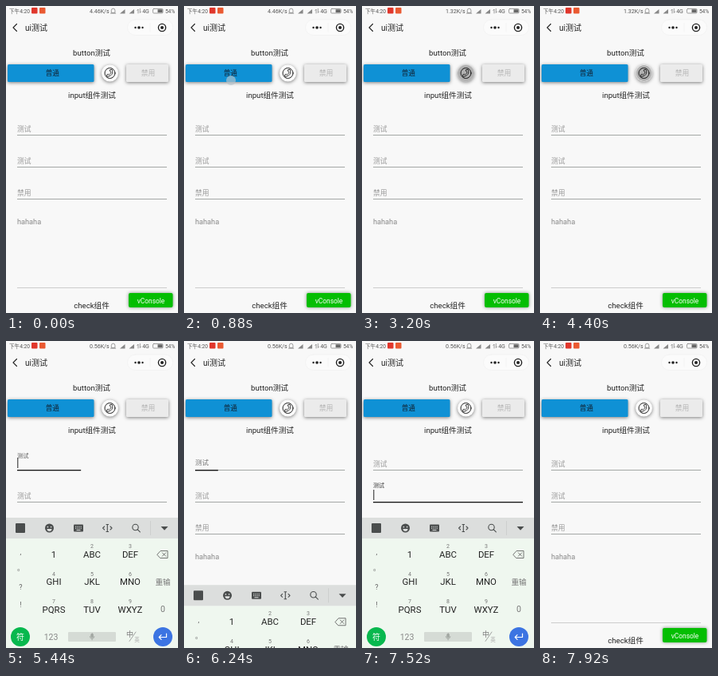
An HTML page that plays this animation: 216x384 px, repeating every 8000 ms.

```html
<!DOCTYPE html>
<html lang="zh">
<head>
<meta charset="utf-8">
<title>ui测试</title>
<style>
  html, body { margin: 0; height: 100%; overflow: hidden; background: #f8f8f8; }
  svg { display: block; width: 100vw; height: 100vh; }
  text { font-family: Roboto, "Noto Sans CJK SC", "Noto Sans CJK", sans-serif; }
  .raised { filter: drop-shadow(0 1.6px 1.9px rgba(0, 0, 0, .5)); }
  .glow { filter: drop-shadow(0 0 2.2px rgba(0, 40, 0, .5)); }
  .line { fill: none; stroke-linecap: round; stroke-linejoin: round; }
</style>
</head>
<body>
<svg id="stage" viewBox="0 0 216 384">
  <defs>
    <clipPath id="buttonClip"><rect x="2" y="73" width="108.500" height="22" rx="1.500"/></clipPath>
    <clipPath id="phoneClip"><circle cx="130.500" cy="84" r="10.500"/></clipPath>
  </defs>
  <rect width="216" height="384" fill="#f8f8f8"/>

  <g id="status">
    <rect x="32" y="2" width="7.500" height="7.500" rx="1" fill="#e0372c"/>
    <rect x="42" y="2" width="7.500" height="7.500" rx="1" fill="#ea5a32"/>
    <g class="line" stroke="#777" stroke-width=".7">
      <path d="M132.300 8V5.500a2.300 2.300 0 0 1 4.600 0V8zM131.500 9.200h6.200"/>
      <path d="M166 9V4l-1.200 1.400M168.300 3.500v5l1.200-1.400"/>
      <rect x="184.500" y="3.500" width="12.500" height="5.500" rx="1.200"/>
    </g>
    <path d="M143 9.500h6.500v-5.500zM154.500 9.500h6.500v-5.500z" fill="#888"/>
    <rect x="190.500" y="4.300" width="6" height="3.900" fill="#666"/>
  </g>

  <g class="line" stroke="#222">
    <path d="M13.500 22.500 9 27l4.500 4.500" stroke-width="1.100"/>
    <rect x="152.500" y="17" width="57" height="19.500" rx="9.750" fill="#fbfbfb" stroke="#eee" stroke-width=".6"/>
    <path d="M181 21.500v10.500" stroke="#eee" stroke-width=".6"/>
    <circle cx="196" cy="27" r="4.600" stroke-width="1.400"/>
  </g>
  <g fill="#222">
    <circle cx="162.500" cy="27" r="1.200"/><circle cx="167" cy="27" r="1.800"/>
    <circle cx="171.500" cy="27" r="1.200"/><circle cx="196" cy="27" r="2"/>
  </g>

  <g id="buttons">
    <rect class="raised" x="2" y="73" width="108.500" height="22" rx="1.500" fill="#0f91d5"/>
    <circle class="raised" cx="130.500" cy="84" r="10.500" fill="#fcfcfc"/>
    <rect class="raised" x="151" y="73" width="53" height="22" rx="1.500" fill="#ebebeb"/>
    <g class="line" transform="translate(130.500 84)" stroke="#222">
      <circle r="6.500" stroke-width="1"/>
      <path d="M.4-4.300 2.500-4.600C5 0 1.500 4.300-3.700 4.200L-4.200 2.200-2.200 1.300-1.200 2C.6 1.200 1.500-.2 1.300-1.800L.2-2.500z" stroke-width=".9"/>
    </g>
  </g>
  <g id="ripplesButton" clip-path="url(#buttonClip)"></g>
  <g id="ripplesPhone" clip-path="url(#phoneClip)"></g>

  <g id="form"></g>
  <rect class="glow" x="154" y="359" width="55.500" height="18" rx="2" fill="#04be02"/>
  <g id="labels"></g>
  <g id="touches"></g>

  <g id="keyboard">
    <rect y="221" width="216" height="163" fill="#eff7ef"/>
    <rect y="221" width="216" height="26" fill="#dcdedd"/>
    <rect x="12" y="228" width="12" height="12" rx="1" fill="#4a4d4d"/>
    <circle cx="54.500" cy="234" r="5.500" fill="#4a4d4d"/>
    <g fill="#dcdedd">
      <circle cx="52.400" cy="232.600" r=".9"/><circle cx="56.600" cy="232.600" r=".9"/>
      <path d="M51.500 235h6a3 3 0 0 1-6 0z"/>
    </g>
    <rect x="85" y="229.500" width="12" height="9" rx="1" fill="#4a4d4d"/>
    <path d="M87 232.300h8M87 234.300h8" stroke="#dcdedd" stroke-dasharray="1.200 1"/>
    <path d="M88.500 236.500h5" stroke="#dcdedd"/>
    <g class="line" stroke="#4a4d4d" stroke-width="1.100">
      <path d="M127.300 229.500v9M126 229.500h2.600M126 238.500h2.600M123.600 232l-2 2 2 2M131 232l2 2-2 2"/>
      <circle cx="162.500" cy="233" r="3.700"/><path d="m165.300 235.800 3 3"/>
    </g>
    <path d="M181.500 225v18" stroke="#c6c9c8" stroke-width=".7"/>
    <path d="M194.500 232h9l-4.500 4.700z" fill="#4a4d4d"/>
    <g class="line" stroke="#666" stroke-width=".9">
      <path d="M190 267l4-4.500h9v9h-9zM196.300 264.800l4.400 4.400M200.700 264.800l-4.400 4.400"/>
      <path d="M155 375.500 163 364" stroke="#999"/>
    </g>
    <rect x="78" y="364" width="60" height="12" rx="1" fill="#d5dbd5"/>
    <g class="line" stroke="#a2a7a2" stroke-width=".9">
      <rect x="106.800" y="366" width="2.600" height="5" rx="1.300" fill="#a2a7a2"/>
      <path d="M105.300 369.500a2.800 2.800 0 0 0 5.600 0M108.100 372.300v1.700"/>
    </g>
    <circle cx="18" cy="370" r="12" fill="#08b84e"/>
    <circle cx="197" cy="370" r="12" fill="#3c74e2"/>
    <path class="line" d="M201.500 366v4.500h-9M195 367.700l-2.800 2.800 2.800 2.800" stroke="#fff" stroke-width="1.200"/>
    <g id="keys"></g>
  </g>
</svg>
<script>
const LOOP = 8000;
const $ = id => document.getElementById(id);

function add(parent, tag, attrs) {
  const el = document.createElementNS('http://www.w3.org/2000/svg', tag);
  for (const name in attrs) el.setAttribute(name, attrs[name]);
  return parent.appendChild(el);
}

// y is the vertical centre of the text
function label(parent, str, x, y, size, fill, anchor = 'middle', weight = 400) {
  const el = add(parent, 'text', {
    x, y: y + size * .36, 'font-size': size, fill, 'text-anchor': anchor, 'font-weight': weight
  });
  el.textContent = str;
  return el;
}

// steps: [ms, value, easing to the next step]
function animate(el, prop, steps) {
  const all = [[0, steps[0][1]], ...steps, [LOOP, steps[steps.length - 1][1]]];
  el.animate(all.map(([ms, value, easing = 'linear']) => ({ offset: ms / LOOP, [prop]: value, easing })),
    { duration: LOOP, iterations: Infinity });
}

function showBetween(el, from, to) {
  animate(el, 'opacity', [[from, 0], [from, 1], [to, 1], [to, 0]]);
}

function hideBetween(el, from, to) {
  animate(el, 'opacity', [[from, 1], [from, 0], [to, 0], [to, 1]]);
}

// Status bar and titles
const status = $('status'), labels = $('labels');
const speed = str => label(status, str, 105, 6.3, 7, '#555', 'start');
label(status, '下午4:20', 4, 6.3, 6.6, '#555', 'start');
label(status, '4G', 175.5, 6.3, 7, '#555');
label(status, '54%', 206, 6.3, 6.6, '#555');
hideBetween(speed('4.46K/s'), 1200, 7999);
showBetween(speed('1.32K/s'), 1200, 5200);
showBetween(speed('0.56K/s'), 5200, 7999);

label(labels, 'ui测试', 24, 27, 10, '#222', 'start');
label(labels, 'button测试', 107.5, 58.4, 9.6, '#222');
label(labels, 'input组件测试', 108, 111.7, 9.6, '#222');
label(labels, 'check组件', 107.5, 374.5, 9.6, '#222');
label(labels, 'vConsole', 182, 368.6, 8.4, '#fff');
label($('buttons'), '普通', 58.3, 84.2, 8.6, '#123', 'middle', 500);
label($('buttons'), '禁用', 178.5, 84.2, 8.8, '#b4b4b4');

// Form fields: y of the underline, caption, focus and blur times
function field(y, text, focus, blur) {
  const g = add($('form'), 'g', { transform: `translate(14 ${y})` });
  const rule = add(g, 'rect', { width: 188, height: 1, fill: '#a4a8a6' });
  const caption = label(g, text, 0, -7, 8.8, '#999', 'start');
  if (!focus) return;
  const bar = add(g, 'rect', { width: 188, height: 1.3, fill: '#111' });
  const caret = add(g, 'rect', { x: .3, y: -15, width: 1, height: 13, fill: '#222' });
  const grow = focus + 80, up = 'translateY(-14.5px) scale(.8)', down = 'translateY(0px) scale(1)';
  animate(caption, 'transform', [[focus, down, 'ease-out'], [focus + 240, up], [blur, up, 'ease-out'], [blur + 240, down]]);
  animate(caption, 'fill', [[focus, '#999'], [grow + 190, '#333'], [blur, '#333'], [blur + 240, '#999']]);
  animate(bar, 'transform', [[grow, 'scaleX(0)'], [grow + 190, 'scaleX(1)'], [blur, 'scaleX(1)'], [blur + 190, 'scaleX(0)']]);
  hideBetween(rule, focus, blur);
  showBetween(caret, focus, blur);
}
field(161, '测试', 5280, 6080);
field(201, '测试', 6745, 7560);
field(241, '禁用');
label($('form'), 'hahaha', 14, 270, 9.2, '#888', 'start');
add($('form'), 'rect', { x: 14, y: 352, width: 188, height: .7, fill: '#bbb' });

// Taps: time, position, and the control that ripples
const rippleSize = { Button: 62, Phone: 11 };
[
  [160, 60, 88, 'Button'], [800, 59, 93, 'Button'], [1400, 60, 87, 'Button'], [2000, 60, 84, 'Button'],
  [2840, 130.5, 84, 'Phone'], [3440, 130.5, 84, 'Phone'], [4080, 130.5, 84, 'Phone'],
  [5120, 50, 155], [6680, 60, 194]
].forEach(([ms, x, y, target]) => {
  const place = { transform: `translate(${x} ${y})` };
  const dot = add(add($('touches'), 'g', place), 'circle', { r: 6, fill: '#b4c3cc', 'fill-opacity': .68 });
  showBetween(dot, ms, ms + 160);
  if (!target) return;
  const wave = add(add($('ripples' + target), 'g', place), 'circle', { r: rippleSize[target], fill: '#000' });
  const start = ms + 80, alpha = target === 'Phone' ? .3 : .14;
  animate(wave, 'transform', [[start, 'scale(0)', 'ease-out'], [start + 320, 'scale(1)']]);
  animate(wave, 'opacity', [[start, 0], [start, alpha], [start + 320, alpha], [start + 480, 0]]);
});

// Keyboard
const keys = $('keys');
['1', 'ABC', 'DEF', 'GHI', 'JKL', 'MNO', 'PQRS', 'TUV', 'WXYZ'].forEach((key, i) => {
  const x = 60 + i % 3 * 48, y = 266.7 + Math.floor(i / 3) * 34.5;
  label(keys, key, x, y, 11.4, '#222');
  if (i) label(keys, i + 1, x, y - 10, 7, '#777');
});
[[',', 264], ['。', 284], ['?', 308], ['!', 330]].forEach(([mark, y]) => label(keys, mark, 18.5, y, 9, '#666'));
label(keys, '重输', 197, 301.3, 9.6, '#777');
label(keys, '0', 197, 335.7, 10.5, '#777');
label(keys, '符', 18, 370, 10, '#fff');
label(keys, '123', 56.5, 370, 10.5, '#888');
label(keys, '中', 155.5, 366.5, 9, '#777');
label(keys, '英', 164.5, 374, 6.5, '#aaa');

const shown = 'translateY(0px)', hidden = 'translateY(163px)';
animate($('keyboard'), 'transform', [
  [5155, hidden, 'ease-out'], [5400, shown], [6080, shown, 'ease-in'], [6320, hidden],
  [6802, hidden, 'ease-out'], [7047, shown], [7560, shown, 'ease-in'], [7800, hidden]
]);
</script>
</body>
</html>
```
